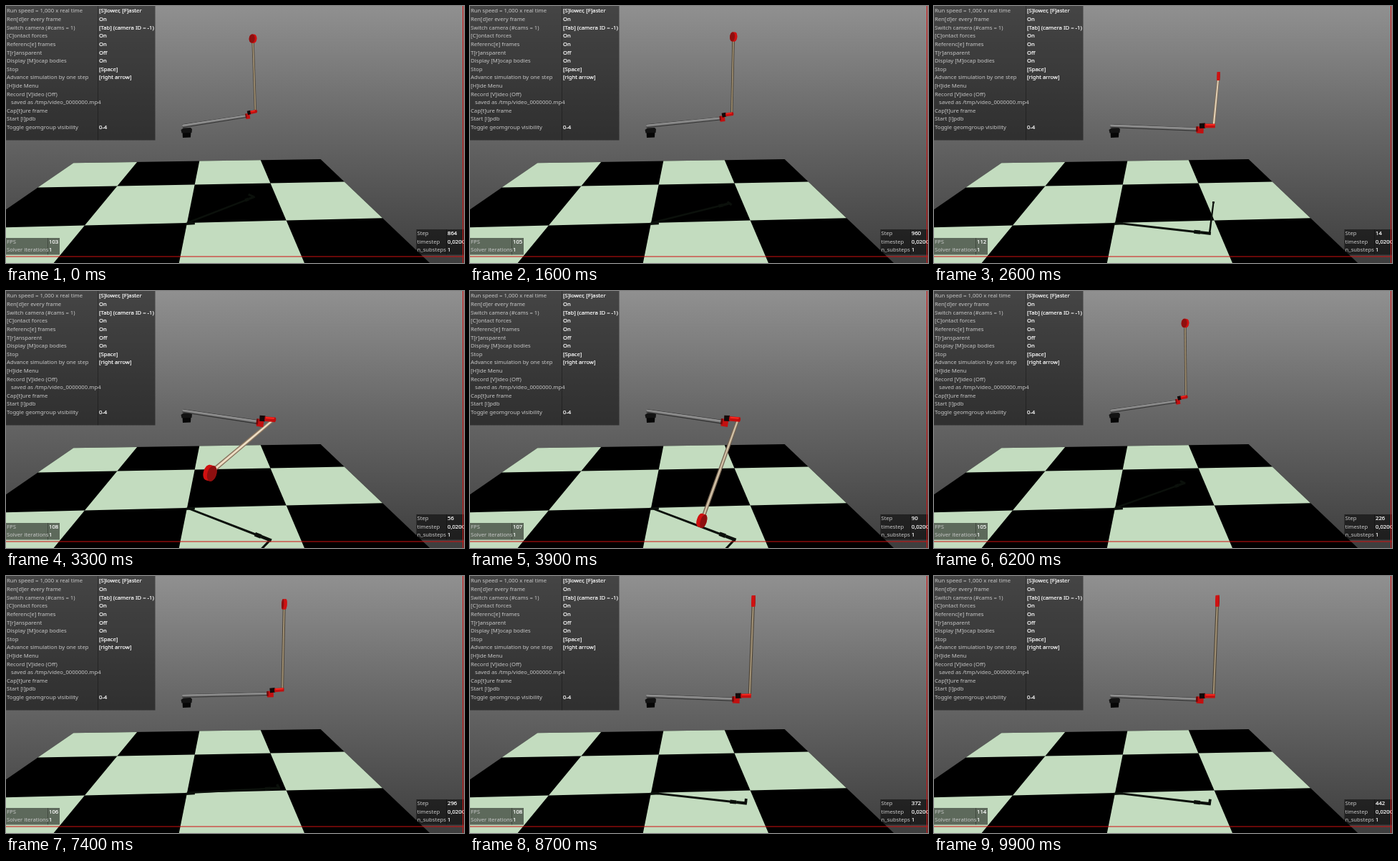
Recreate the animation shown at these times as an HTML page with a canvas. Size 640 px wide and 359 px high, loop 10 s.

```html
<!DOCTYPE html>
<html lang="en">
<head>
<meta charset="utf-8">
<title>Rotary pendulum simulation</title>
<style>
  html, body { margin: 0; width: 100%; height: 100%; overflow: hidden; background: #555; }
  #stage { position: relative; width: 640px; height: 359px; overflow: hidden; }
  canvas, svg { position: absolute; left: 0; top: 0; display: block; }
  text { font: 7.7px "Noto Sans", "Open Sans", sans-serif; fill: #c8c8c8; white-space: pre; }
  .value { fill: #fff; stroke: #fff; stroke-width: .2px; }
  .panel { fill: #000; fill-opacity: .52; }
  .split { fill: #000; fill-opacity: .3; }
  .guide { fill: #d01010; }
</style>
</head>
<body>
<div id="stage">
  <canvas id="scene" width="640" height="359"></canvas>
  <svg id="hud" width="640" height="359" viewBox="0 0 640 359"></svg>
</div>
<script>
const ctx = document.getElementById('scene').getContext('2d');
const hud = document.getElementById('hud');
const LOOP = 10000, TICK = 100;
const RAD = Math.PI / 180;

// ---------- overlay ----------
function add(tag, attrs, content = '') {
  const el = document.createElementNS('http://www.w3.org/2000/svg', tag);
  for (const key in attrs) el.setAttribute(key, attrs[key]);
  el.textContent = content;
  hud.append(el);
  return el;
}

function panel(x, y, w, h, split, firstRow, pitch, rows) {
  add('rect', { class: 'panel', x, y, width: w, height: h });
  add('rect', { class: 'split', x: split - 1, y, width: 1, height: h });
  return rows.map(([label, value = ''], i) => {
    const base = firstRow + 2.7 + i * pitch;
    add('text', { x: x + (label[0] === ' ' ? 7 : 1), y: base }, label.trim());
    return add('text', { class: 'value', x: split + 1, y: base }, value);
  });
}

panel(0, 0, 208.5, 187.5, 129, 6.7, 11.62, [
  ['Run speed = 1,000 x real time', '[S]lower, [F]aster'],
  ['Ren[d]er every frame', 'On'],
  ['Switch camera (#cams = 1)', '[Tab] (camera ID = -1)'],
  ['[C]ontact forces', 'On'],
  ['Referenc[e] frames', 'On'],
  ['T[r]ansparent', 'Off'],
  ['Display [M]ocap bodies', 'On'],
  ['Stop', '[Space]'],
  ['Advance simulation by one step', '[right arrow]'],
  ['[H]ide Menu'],
  ['Record [V]ideo (Off)'],
  [' saved as /tmp/video_0000000.mp4'],
  ['Cap[t]ure frame'],
  ['Start [i]pdb'],
  ['Toggle geomgroup visibility', '0-4']
]);
const [fpsText] = panel(0, 324, 75, 23.5, 59, 329, 11.7,
  [['FPS'], ['Solver iterations', '1']]);
const [stepText] = panel(573.5, 312, 67, 35.5, 616, 317, 11.8,
  [['Step'], ['timestep', '0,0200'], ['n_substeps', '1']]);
add('rect', { class: 'guide', x: 0, y: 349.5, width: 640, height: 1 });
add('rect', { class: 'guide', x: 638, y: 0, width: 1, height: 359 });

// ---------- motion, t in seconds, angles in degrees ----------
const RESET = 2.4;      // the episode restarts
const CATCH = 5.13;     // the pole reaches the top and is held there
const SWING = 4.03;     // pumping rate, rad/s
const bell = x => Math.exp(-x * x);

function ease(from, length, t) {
  const u = Math.min(1, Math.max(0, (t - from) / length));
  return u * u * (3 - 2 * u);
}

// Slow drift, then pumping to one side, then overshoot and settling
function armAngle(t) {
  if (t < RESET) return 41 - 13 * (t / 1.6) ** 2.9;
  const pump = -34 * ease(RESET, .6, t) - 12 * Math.sin(SWING * (t - RESET)) ** 4;
  const settle = -12.5 + 51 * bell((t - 6.2) / 1.19);
  return pump + (settle - pump) * ease(CATCH - .08, .7, t);
}

// 0 is upright, 180 hangs down
function poleAngle(t) {
  if (t < RESET) return 4 * Math.exp(-2 * t);
  if (t < CATCH) return 180 - 166.5 * Math.sin(SWING * (t - RESET));
  return 363 - 17 * Math.exp(-3 * (t - CATCH));
}

function stepCount(t) {
  const steps = t < RESET ? 864 + 60 * t : 2.5 + 58.6 * (t - RESET);
  return Math.min(1000, 2 * Math.round(steps / 2));
}

function frameRate(t) {
  if (t < RESET) return Math.round(103 + 1.25 * t);
  return Math.round(105 + 7 * Math.exp(2.6 - t) + 9 * (t / 9.9) ** 8);
}

// ---------- camera ----------
// Coordinates: r to the right, g into the scene, z up.
const EYE = [.485, -2.85, 1.578];

function project([r, g, z]) {
  const depth = 3.135 + .974 * g - .2258 * z;
  return [
    320 + 433 * (r - .485) / depth,
    179.5 - 433 * (.2258 * g + .974 * z - .894) / depth,
    depth
  ];
}
const move = (p, dir, k) => p.map((c, i) => c + dir[i] * k);
const drop = ([r, g]) => [r, g, 0];

function polygon(points, color) {
  ctx.beginPath();
  points.forEach(([x, y]) => ctx.lineTo(x, y));
  ctx.fillStyle = color;
  ctx.fill();
}
const fill = (points, color) => polygon(points.map(project), color);

// A bar with a real thickness, thinner when farther away
function bar(a, b, size, color) {
  const p = project(a), q = project(b);
  const dx = q[0] - p[0], dy = q[1] - p[1], len = Math.hypot(dx, dy) || 1;
  const edge = (end, side) => {
    const k = side * 216 * size / end[2] / len;
    return [end[0] - dy * k, end[1] + dx * k];
  };
  polygon([edge(p, 1), edge(q, 1), edge(q, -1), edge(p, -1)], color);
}

function ring(center, a, b, radius) {
  return Array.from({ length: 24 }, (_, i) => {
    const w = i * Math.PI / 12;
    return move(move(center, a, radius * Math.cos(w)), b, radius * Math.sin(w));
  });
}

// A short solid cylinder: rim first, then the face turned to the viewer
function disc(center, axis, a, b, radius, half, rim, face) {
  const toEye = axis.reduce((sum, c, i) => sum + c * (EYE[i] - center[i]), 0);
  const front = ring(move(center, axis, Math.sign(toEye) * half), a, b, radius);
  const back = ring(move(center, axis, -Math.sign(toEye) * half), a, b, radius);
  fill(back, rim);
  front.forEach((p, i) => {
    const j = (i + 1) % front.length;
    fill([p, front[j], back[j], back[i]], rim);
  });
  fill(front, face);
}

// ---------- scene ----------
const sky = ctx.createLinearGradient(0, 0, 0, 359);
sky.addColorStop(0, '#909090');
sky.addColorStop(.45, '#696969');
sky.addColorStop(1, '#3e3e3e');

function drawFloor() {
  const size = 1.012, yaw = .05;
  const corner = (x, y) => [size * (x - yaw * y), size * (yaw * x + y), 0];
  const tile = (x, y, n, color) =>
    fill([corner(x, y), corner(x + n, y), corner(x + n, y + n), corner(x, y + n)], color);
  tile(-2, -2, 4, '#000');
  for (let x = -2; x < 2; x++)
    for (let y = -2; y < 2; y++)
      if ((x + y) & 1) tile(x, y, 1, '#c3dcbf');
}

function drawBase() {
  polygon([[246.5, 175], [258.5, 175], [258, 183.5], [247, 184]], '#060606');
  polygon([[244.5, 173], [248, 170.5], [258, 170], [260, 172], [259.5, 177], [245.5, 177.5]], '#131313');
}

function drawRig(armDeg, poleDeg) {
  const phi = armDeg * RAD, alpha = poleDeg * RAD;
  const out = [Math.cos(phi), Math.sin(phi), 0];
  const side = [-out[1], out[0], 0];
  const up = [0, 0, 1];
  const at = (radius, z) => move([0, 0, z], out, radius);
  const along = side.map((c, i) => c * Math.sin(alpha) + up[i] * Math.cos(alpha));
  const across = side.map((c, i) => c * Math.cos(alpha) - up[i] * Math.sin(alpha));
  const tip = at(.948, 1.042), bulb = move(tip, along, .793);

  // shadow straight below
  const dark = '#0b100b';
  bar([0, 0, 0], drop(at(.86, 0)), .02, dark);
  bar(drop(at(.8, 0)), drop(at(.86, 0)), .036, dark);
  bar(drop(at(.86, 0)), drop(at(.96, 0)), .028, dark);
  bar(drop(tip), drop(bulb), .018, dark);
  bar(drop(move(bulb, across, -.045)), drop(move(bulb, across, .045)), .026, dark);
  bar([-.01, -.02, 0], [.08, -.01, 0], .024, dark);

  drawBase();

  // arm
  bar(at(-.01, 1), at(.82, 1.003), .033, '#343434');
  bar(at(-.01, 1.003), at(.82, 1.006), .022, '#7c7c7c');
  bar(at(-.01, 1.008), at(.82, 1.011), .007, '#9c9c9c');

  // pole and weight
  const lit = Math.abs(Math.sin(alpha));
  const shade = (from, to) =>
    `rgb(${from.map((c, i) => Math.round(c + (to[i] - c) * lit)).join()})`;
  bar(tip, bulb, .026, shade([72, 64, 52], [140, 118, 96]));
  bar(tip, bulb, .013, shade([156, 140, 112], [240, 224, 198]));
  disc(bulb, out, across, along, .045, .014, '#d01111', '#8e0f0f');

  // motor and joint
  bar(at(.8, 1), at(.862, 1), .06, '#c31010');
  bar(at(.795, 1.006), at(.812, 1.006), .046, '#700b0b');
  bar(at(.825, 1.036), at(.875, 1.04), .045, '#140909');
  bar(at(.87, 1.038), at(.96, 1.042), .036, '#c40f0f');
  bar(at(.88, 1.048), at(.96, 1.052), .011, '#fb2a20');
  fill(ring(at(.96, 1.042), side, up, .018), '#b80f0f');
}

function draw() {
  const t = Math.floor(performance.now() % LOOP / TICK) * TICK / 1000;
  ctx.fillStyle = sky;
  ctx.fillRect(0, 0, 640, 359);
  drawFloor();
  drawRig(armAngle(t), poleAngle(t));
  stepText.textContent = stepCount(t);
  fpsText.textContent = frameRate(t);
  requestAnimationFrame(draw);
}
draw();
</script>
</body>
</html>
```
